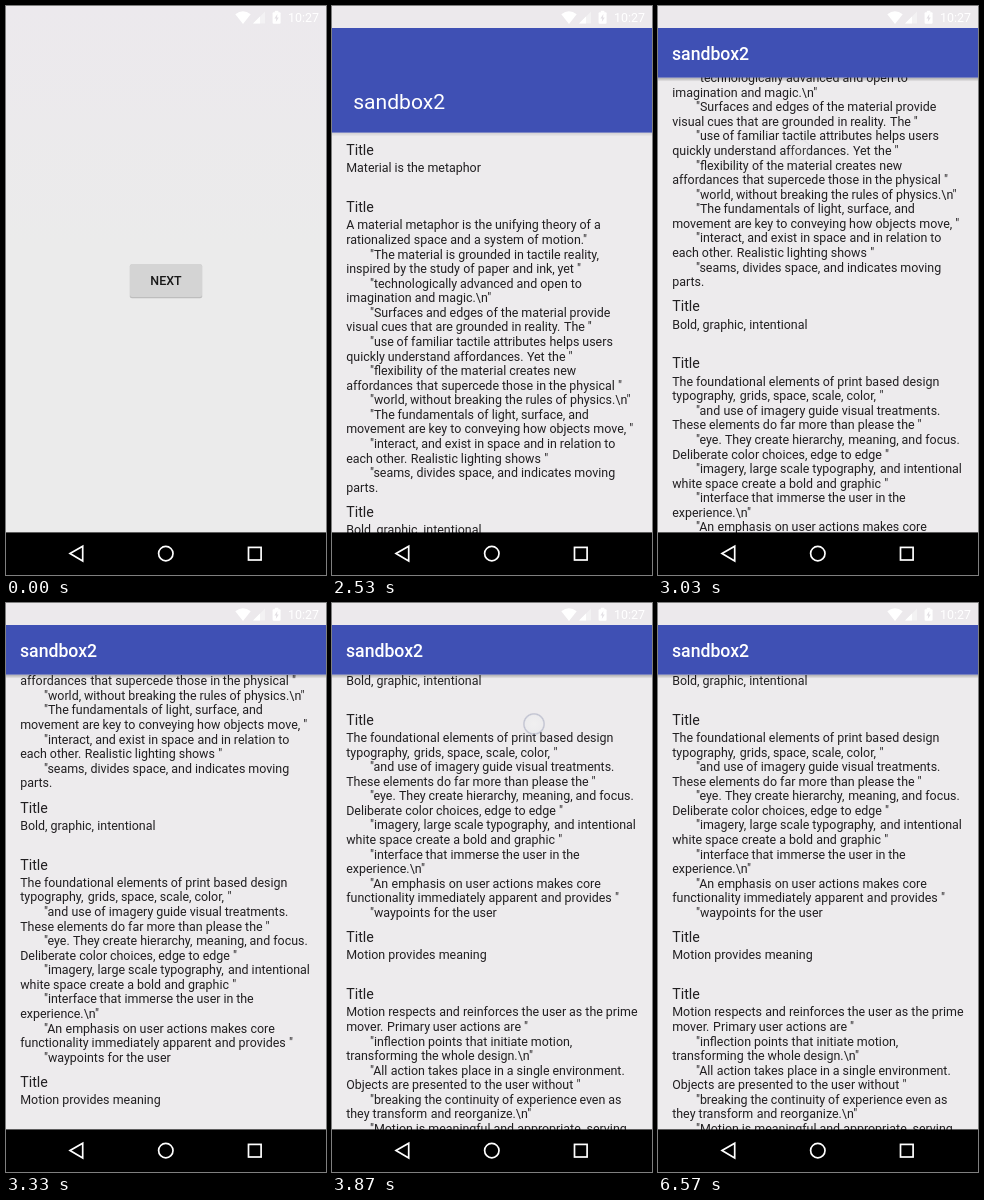
An HTML page with a canvas for the animation above (6.61 s loop, 320 by 569 pixels).

```html
<!DOCTYPE html>
<html lang="en">
<head>
<meta charset="utf-8">
<title>Collapsing toolbar</title>
<style>
html, body { margin: 0; width: 100%; height: 100%; overflow: hidden; background: #ebebeb; }
canvas { display: block; width: 320px; height: 569px; }
</style>
</head>
<body>
<canvas id="stage"></canvas>
<script>
const W = 320, H = 569, LOOP = 6610;
const STATUS = 22, NAV = 526.4, BAR_OPEN = 126.6, BAR_SHUT = 71.6;
const LINE = 14.57, BODY = 12.44;
const NATIVE = 1080 / W; // device pixels per stage pixel
const FONT = 'Roboto, "Open Sans", sans-serif';

const canvas = document.getElementById('stage');
const g = canvas.getContext('2d');
const dpr = window.devicePixelRatio || 1;
canvas.width = W * dpr;
canvas.height = H * dpr;

// The device rounds every glyph advance to whole pixels; place words the same way.
function layout(line) {
  g.font = `${BODY * NATIVE}px ${FONT}`;
  const advance = c => Math.round(g.measureText(c).width) / NATIVE;
  const gap = advance(' ');
  let x = line[0] === '"' ? 8 * gap : 0;
  return line.split(' ').map(word => {
    const item = { word, x };
    x += [...word].reduce((sum, c) => sum + advance(c), gap);
    return item;
  });
}

// Lines starting with a quote are indented; the short items end in an empty line.
const blocks = [
  'Material is the metaphor\n',
  `A material metaphor is the unifying theory of a
rationalized space and a system of motion."
"The material is grounded in tactile reality,
inspired by the study of paper and ink, yet "
"technologically advanced and open to
imagination and magic.\\n"
"Surfaces and edges of the material provide
visual cues that are grounded in reality. The "
"use of familiar tactile attributes helps users
quickly understand affordances. Yet the "
"flexibility of the material creates new
affordances that supercede those in the physical "
"world, without breaking the rules of physics.\\n"
"The fundamentals of light, surface, and
movement are key to conveying how objects move, "
"interact, and exist in space and in relation to
each other. Realistic lighting shows "
"seams, divides space, and indicates moving
parts.`,
  'Bold, graphic, intentional\n',
  `The foundational elements of print based design
typography, grids, space, scale, color, "
"and use of imagery guide visual treatments.
These elements do far more than please the "
"eye. They create hierarchy, meaning, and focus.
Deliberate color choices, edge to edge "
"imagery, large scale typography, and intentional
white space create a bold and graphic "
"interface that immerse the user in the
experience.\\n"
"An emphasis on user actions makes core
functionality immediately apparent and provides "
"waypoints for the user`,
  'Motion provides meaning\n',
  `Motion respects and reinforces the user as the prime
mover. Primary user actions are "
"inflection points that initiate motion,
transforming the whole design.\\n"
"All action takes place in a single environment.
Objects are presented to the user without "
"breaking the continuity of experience even as
they transform and reorganize.\\n"
"Motion is meaningful and appropriate, serving`
].map(block => block.split('\n').map(layout));

const clamp = (v, a = 0, b = 1) => Math.min(b, Math.max(a, v));
const span = (t, a, b) => clamp((t - a) / (b - a));
const mix = (a, b, p) => a + (b - a) * p;
const easeOut = (p, n = 3) => 1 - Math.pow(1 - p, n);

function text(str, x, y, size, color, weight = 400, align = 'left') {
  g.font = `${weight} ${size}px ${FONT}`;
  g.textAlign = align;
  g.fillStyle = color;
  g.fillText(str, x, y);
}

function poly(points) {
  g.beginPath();
  points.forEach(([x, y]) => g.lineTo(x, y));
  g.closePath();
}

function rect(x, y, w, h, color) {
  g.fillStyle = color;
  g.fillRect(x, y, w, h);
}

function round(x, y, w, h, r, color) {
  g.fillStyle = color;
  g.beginPath();
  g.roundRect(x, y, w, h, r);
  g.fill();
}

function statusBar() {
  g.fillStyle = '#fff';
  g.beginPath();
  g.moveTo(237, 18);
  g.lineTo(229.3, 8.2);
  g.quadraticCurveTo(237, 2.4, 244.7, 8.2);
  g.closePath();
  g.fill();
  g.globalAlpha = 0.4;
  poly([[247, 17.6], [259, 17.6], [259, 5.6]]);
  g.fill();
  g.globalAlpha = 1;
  poly([[247, 17.6], [254, 17.6], [254, 10.6]]);
  g.fill();
  round(266.6, 6.2, 8, 11.6, 1, '#fff');
  rect(268.8, 4.8, 3.6, 2, '#fff');
  poly([[271.4, 8], [268.4, 12.6], [270.2, 12.6], [269.8, 16], [272.8, 11.4], [271, 11.4]]);
  g.fillStyle = '#e4e1e5';
  g.fill();
  text('10:27', 313, 16.3, BODY, '#fff', 400, 'right');
}

function navBar() {
  rect(0, NAV, W, H - NAV, '#000');
  g.strokeStyle = '#fff';
  g.lineWidth = 1.7;
  poly([[64, 547.6], [76.7, 540.2], [76.7, 555]]);
  g.stroke();
  g.beginPath();
  g.arc(159.8, 547.6, 7.2, 0, 7);
  g.stroke();
  g.strokeRect(242.5, 541.4, 12.6, 12.6);
}

function startScreen(t) {
  const bg = g.createLinearGradient(0, 0, 0, 240);
  bg.addColorStop(0, '#ece9ed');
  bg.addColorStop(1, '#ebebeb');
  rect(0, 0, W, H, bg);
  round(123.8, 258.6, 72.4, 33.6, 2, '#bdbdbd');
  round(124, 258, 72, 33, 2, '#d4d4d4');
  const press = span(t, 1700, 1850);
  if (press) round(124, 258, 72, 33, 2, `rgba(0,0,0,${0.08 * press})`);
  text('NEXT', 160, 279, BODY, '#181818', 500, 'center');
}

function article(scroll) {
  let y = 149.2 - scroll;
  for (const lines of blocks) {
    text('Title', 14.2, y, 14.22, '#211f21');
    lines.forEach((words, i) => {
      for (const { word, x } of words) {
        text(word, 14.2 + x, y + 17.2 + i * LINE, BODY, '#211f21');
      }
    });
    y += 42.5 + (lines.length - 1) * LINE;
  }
}

function appBar(scroll) {
  const fold = clamp(scroll / (BAR_OPEN - BAR_SHUT));
  const bottom = mix(BAR_OPEN, BAR_SHUT, fold);
  const shade = g.createLinearGradient(0, bottom, 0, bottom + 4);
  shade.addColorStop(0, `rgba(0,0,0,${mix(0.12, 0.28, fold)})`);
  shade.addColorStop(1, 'rgba(0,0,0,0)');
  rect(0, bottom, W, 4, shade);
  rect(0, STATUS, W, bottom - STATUS, '#3f50b4');
  text('sandbox2', mix(21.2, 14, fold), mix(103.3, 53.5, fold),
    mix(21.1, 17.65, fold), '#fff', fold > 0.99 ? 500 : 400);
}

function articleScreen(scroll) {
  rect(0, 0, W, H, '#edebed');
  article(scroll);
  rect(0, 0, W, STATUS, '#ece9ec');
  appBar(scroll);
}

function touch(x, y, alpha) {
  if (alpha <= 0) return;
  const spot = g.createRadialGradient(x, y, 0, x, y, 11.5);
  spot.addColorStop(0, 'rgba(242,242,242,.75)');
  spot.addColorStop(0.76, 'rgba(236,236,238,.72)');
  spot.addColorStop(0.88, 'rgba(155,160,185,.6)');
  spot.addColorStop(1, 'rgba(160,164,185,0)');
  g.globalAlpha = alpha;
  g.fillStyle = spot;
  g.beginPath();
  g.arc(x, y, 11.5, 0, 7);
  g.fill();
  g.globalAlpha = 1;
}

const fling = t => 301.5 * easeOut(Math.pow(span(t, 2820, 3330), 1.3));
const flick = t => 144.8 * easeOut(span(t, 3735, 3865), 1.5);

function draw(t) {
  g.setTransform(dpr, 0, 0, dpr, 0, 0);
  const enter = t - 1870;
  if (enter < 200) startScreen(t);
  if (enter > 0) {
    g.save();
    g.globalAlpha = span(enter, 0, 200);
    g.translate(0, 45 * (1 - easeOut(span(enter, 0, 350), 5)));
    articleScreen(fling(t) + flick(t));
    g.restore();
  }
  statusBar();
  navBar();

  if (t >= 1670) touch(162, 278, 1 - span(t, 1780, 1900));
  if (t >= 2760) {
    touch(142, 313 - fling(Math.min(t, 2990)), 0.3 + 0.7 * span(t, 2800, 2870) - 1.1 * span(t, 2960, 3060));
  }
  if (t >= 3690) {
    touch(202, 265.8 - flick(t), span(t, 3680, 3720) - span(t, 3860, 4000));
  }
}

const start = performance.now();
function frame() {
  draw((performance.now() - start) % LOOP);
  requestAnimationFrame(frame);
}
frame();
</script>
</body>
</html>
```
